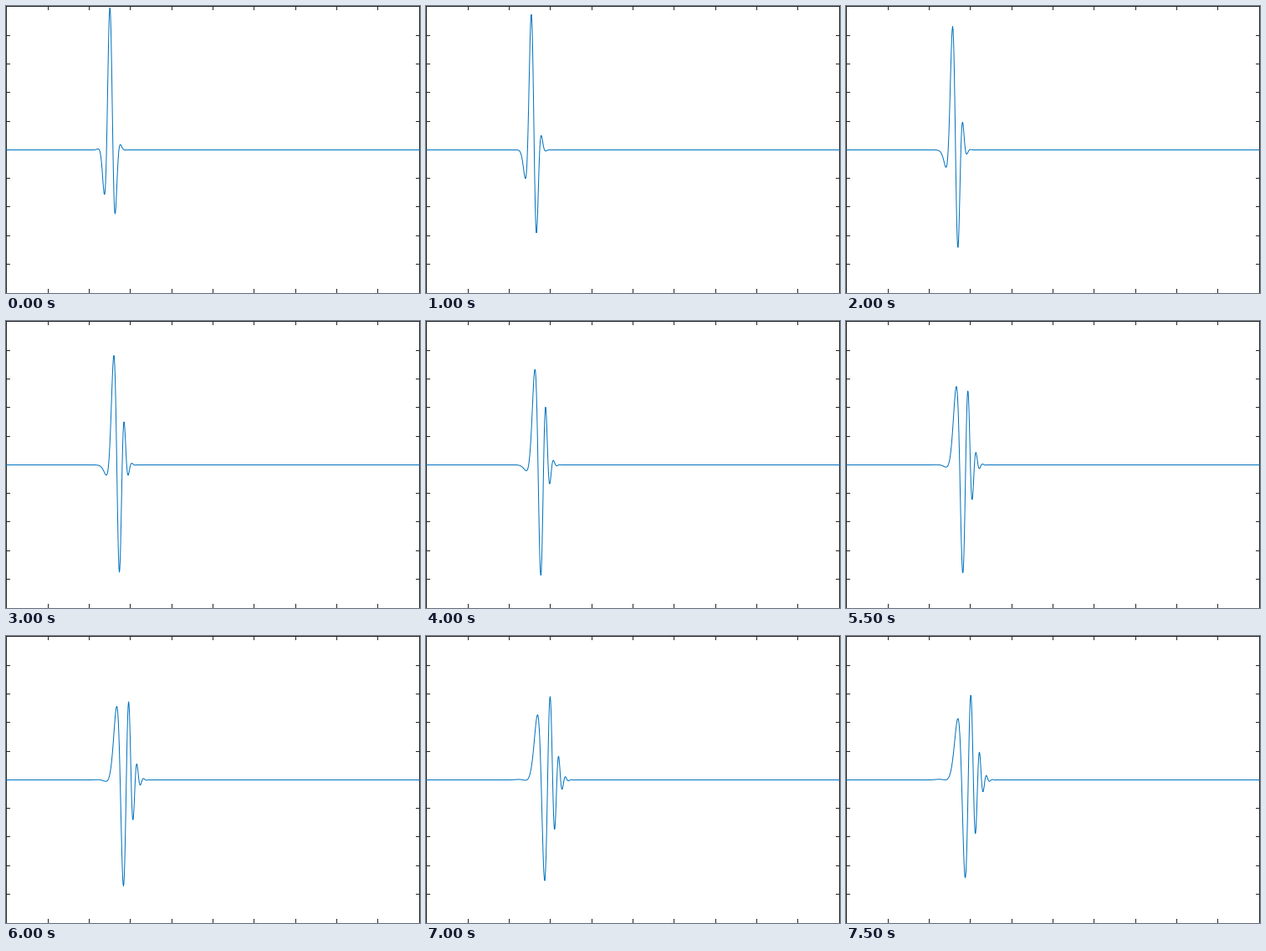
Recreate the animation shown at these times as a matplotlib script. Size 495 px wide and 344 px high, loop 8000 ms.

```python
import numpy as np
import matplotlib.pyplot as plt
from matplotlib.animation import FuncAnimation
from matplotlib.collections import LineCollection

plt.rcParams["path.simplify"] = False

W, H, DPI = 495, 344, 100
FRAMES, STEP_MS = 16, 500
PX = 72 / DPI                    # one pixel in points

# Wave packet on a lattice with one-pixel spacing
X0, BASE, AMP = 123.35, 172.5, 172
K0, S2 = 0.410, 49.0             # carrier wavenumber, squared envelope width
SPREAD = 3.15                    # dispersion gained per frame

x = np.arange(0, W + 0.5, 0.5)
k = np.linspace(K0 - 1.1, K0 + 1.1, 401)
spectrum = np.exp(-(k - K0) ** 2 * S2 / 4)
spectrum /= spectrum.sum()
waves = np.exp(1j * np.outer(x - X0, k))


def packet(i):
    phase = SPREAD * (i + 1) * (1 - np.cos(k))
    return (waves @ (spectrum * np.exp(-1j * phase))).real


def frame_lines():
    """Box without its bottom edge, plus inward ticks on all four sides."""
    segs = [[(0, 0.5), (W, 0.5)], [(0.5, 0), (0.5, H)], [(W - 0.5, 0), (W - 0.5, H)]]
    for n in range(1, 10):
        tx = np.floor(n * 49.35 + 0.7) + 0.5
        ty = np.round(n * 34.3 + 0.4) + 0.5
        segs += [[(tx, 0), (tx, 5)], [(tx, H - 5), (tx, H)]]
        segs += [[(0, ty), (5, ty)], [(W - 5, ty), (W, ty)]]
    return segs


fig = plt.figure(figsize=(W / DPI, H / DPI), dpi=DPI, facecolor="white")
ax = fig.add_axes([0, 0, 1, 1])
ax.set_axis_off()
ax.set_xlim(0, W)
ax.set_ylim(H, 0)
# Coordinates already sit on pixel centres, so snapping is off
ax.add_collection(LineCollection(frame_lines(), colors="#262626", linewidths=PX,
                                 snap=False), autolim=False)
line, = ax.plot(x, BASE - AMP * packet(0), color="#0072BD", lw=PX, zorder=3,
                snap=False)


def update(i):
    line.set_ydata(BASE - AMP * packet(i))
    return line,


anim = FuncAnimation(fig, update, frames=FRAMES, interval=STEP_MS,
                     repeat=True, repeat_delay=0)
plt.show()
```
